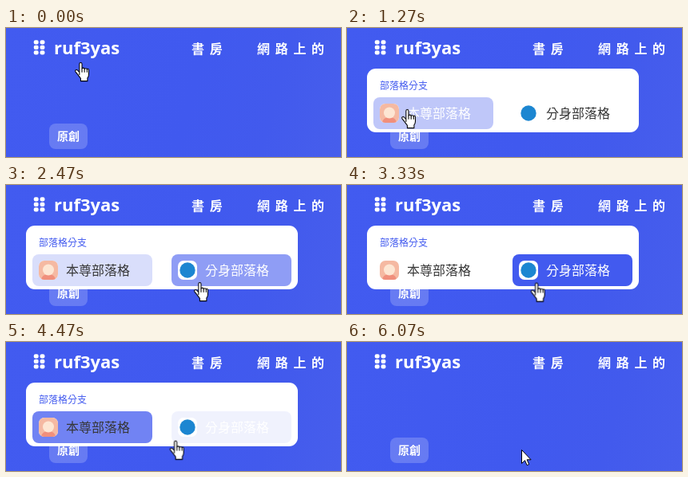
Recreate the animation shown at these times as an HTML page. Size 419 by 162 pixels, loop 6.19 s.

```html
<!DOCTYPE html>
<html lang="zh-Hant">
<head>
<meta charset="utf-8">
<title>Blog menu</title>
<style>
  html, body { margin: 0; width: 100%; height: 100%; overflow: hidden; }
  body { font-family: "Noto Sans CJK TC", "Noto Sans CJK", "Noto Sans", sans-serif; }
  #stage {
    --blue: #425aef;
    position: relative; width: 419px; height: 162px; overflow: hidden;
    background: linear-gradient(105deg, #425bf0 0%, #4059ef 55%, #425aed 78%, #475eec 100%);
    color: #fff; white-space: nowrap;
  }
  #stage * { position: absolute; box-sizing: border-box; }
  .brand { left: 60px; top: 9px; font: 700 22px/30px "Open Sans", sans-serif; }
  .nav { top: 13px; font-weight: 700; font-size: 16px; line-height: 24px; letter-spacing: 6.7px; }
  .badge {
    left: 54px; top: 120px; width: 48px; height: 32px; border-radius: 8px;
    background: rgba(255, 255, 255, .2);
    font-weight: 700; font-size: 14px; line-height: 30px; text-align: center;
  }
  .panel { left: 25px; top: 51px; width: 340px; height: 80px; border-radius: 11px; background: #fff; }
  .heading { left: 16px; top: 11px; font-size: 12px; line-height: 20px; }
  .item { top: 36px; width: 150px; height: 40px; }
  .fill { inset: 0; border-radius: 8px; background: var(--blue); }
  .icon { left: 8px; top: 8px; width: 24px; height: 24px; border-radius: 7px; overflow: hidden; background: #fff; }
  .label { left: 42px; top: 7px; font-size: 16px; line-height: 24px; }
  .tip {
    top: 140px; width: 76px; height: 25px; border: 1px solid #222; background: #fff; color: #222;
    font-size: 12px; line-height: 24px; text-align: center;
  }
  svg { left: 0; top: 0; overflow: visible; }
  .cursor path { fill: #fff; stroke: #000; stroke-linejoin: round; }
</style>
</head>
<body>
<div id="stage">
  <svg width="60" height="40" fill="#fff">
    <g id="dots"></g>
  </svg>
  <div class="brand">ruf3yas</div>
  <div class="nav" style="left:232px">書房</div>
  <div class="nav" style="left:314px">網路上的</div>
  <div class="badge">原創</div>

  <div class="panel" id="panel">
    <div class="heading" id="heading">部落格分支</div>
    <div class="item" style="left:8px">
      <div class="fill" id="fillA"></div>
      <div class="icon">
        <svg width="24" height="24">
          <rect width="24" height="24" fill="#f5b9a2"/>
          <path d="M3 24q1-7 9-7t9 7z" fill="#f08f7c"/>
          <circle cx="12" cy="11.5" r="7" fill="#fde6d3"/>
        </svg>
      </div>
      <div class="label" id="labelA">本尊部落格</div>
    </div>
    <div class="item" style="left:182px">
      <div class="fill" id="fillB"></div>
      <div class="icon">
        <svg width="24" height="24"><circle cx="12" cy="12" r="9.7" fill="#1c86d1"/></svg>
      </div>
      <div class="label" id="labelB">分身部落格</div>
    </div>
  </div>

  <div class="tip" id="tipA">本尊部落格</div>
  <div class="tip" id="tipB">分身部落格</div>

  <svg class="cursor" id="cursor" width="20" height="24">
    <path id="arrow" d="M.5.5v17l4-3.8 2.6 6 2.6-1.1-2.6-5.8h5z"/>
    <g id="hand" transform="translate(-6 0) scale(1.06 1.1)">
      <path d="M5.5 14V2q0-1.5 1.5-1.5T8.5 2v5.5q0-1 1.5-1t1.5 1.5q0-1 1.5-1t1.5 1.5q0-1 1-1t1 1.5v5q0 2-1.5 4v3.5h-8v-3l-3.5-4.5-2.5-3q-.8-1.5.3-2.2 1.2-.6 2.7 1l1.5 1.5z"/>
      <path d="M8.5 7.5v4M11.5 8v3.5M14.5 8.5v3" style="fill:none"/>
    </g>
  </svg>
</div>

<script>
const LOOP = 6190, TICK = 1000 / 15;
const EASE = 'cubic-bezier(.4, 0, .2, 1)';
const HOLD = 'step-end';
const tracks = [];
const $ = id => document.getElementById(id);

for (let i = 0; i < 6; i++) {
  const x = 34.8 + (i % 2) * 7.8, y = 15.3 + (i >> 1) * 6.5;
  $('dots').innerHTML += `<rect x="${x}" y="${y}" width="5.8" height="5.2" rx="2"/>`;
}

// rows: [time, css, easing towards the next row]
function track(id, rows) {
  const last = rows[rows.length - 1];
  const frames = [...rows, [LOOP, last[1]]].map(([at, css, easing = HOLD]) =>
    ({ offset: at / LOOP, easing, ...css }));
  const anim = $(id).animate(frames, { duration: LOOP, fill: 'both' });
  anim.pause();
  tracks.push(anim);
}

// Spans are [on, off] times
function fade(id, spans, ms = 300) {
  const rows = [[0, hide]];
  for (const [on, off] of spans) {
    rows.push([on, hide, EASE], [on + ms, show], [off, show, EASE], [off + ms, hide]);
  }
  track(id, rows);
}
function toggle(id, spans, off, on) {
  track(id, [[0, off], ...spans.flatMap(([a, b]) => [[a, on], [b, off]])]);
}

const hide = { opacity: 0 }, show = { opacity: 1 };
const dark = { color: '#363636' }, light = { color: '#fff' };
const hoverA = [[1180, 2310], [3550, 4390]];
const hoverB = [[2350, 3480], [4420, 5620]];

// Panel: fades in while rising, fades out in place
const low = { transform: 'translateY(8px)' };
track('panel', [[0, hide], [230, hide, EASE], [570, show], [5620, show, EASE], [5930, hide]]);
track('panel', [[0, low], [180, low, 'ease-in-out'], [560, { transform: 'none' }]]);
track('panel', [
  [0, { boxShadow: '0 0 0 1px rgba(227, 232, 247, .6)' }],
  [1060, { boxShadow: '0 0 0 0 rgba(227, 232, 247, 0)' }]
]);
toggle('heading', [[1060, 6000]], { color: '#888' }, { color: '#425aef' });

fade('fillA', hoverA);
fade('fillB', hoverB);
toggle('labelA', hoverA, dark, light);
toggle('labelB', hoverB, dark, light);

const at = x => ({ opacity: 1, left: x + 'px' });
const gone = { opacity: 0, left: '0px' };
track('tipA', [[0, gone], [2060, at(115)], [2190, gone], [4060, at(166)], [4260, gone]]);
track('tipB', [[0, gone], [2995, at(255)], [3330, gone], [5060, at(228)], [5595, gone]]);

// Pointer hot spot: [time, x, y]
const path = [
  [0, 92, 43], [330, 51, 31], [940, 51, 31], [1120, 60, 72], [1267, 74, 102],
  [1600, 98, 119], [1800, 108, 124], [2130, 108, 124], [2310, 183, 123],
  [2467, 241, 122], [2600, 244, 122], [2800, 244, 122], [3000, 248, 122],
  [3270, 248, 122], [3480, 207, 124], [3550, 183, 125], [3800, 159, 125],
  [4210, 159, 125], [4390, 183, 125], [4420, 207, 124], [4600, 221, 123],
  [5540, 221, 123], [5660, 218, 134], [6000, 218, 134], [6060, 218, 135]
];
track('cursor', path.map(([t, x, y]) =>
  [t, { transform: `translate(${x}px, ${y}px)` }, 'linear']));
const pointing = [[0, 260], [1160, 5620]];
toggle('hand', pointing, hide, show);
toggle('arrow', pointing, show, hide);

const start = performance.now();
function draw() {
  const t = (performance.now() - start) % LOOP;
  const now = Math.floor((t + 4) / TICK) * TICK;
  for (const anim of tracks) anim.currentTime = now;
  requestAnimationFrame(draw);
}
draw();
</script>
</body>
</html>
```
